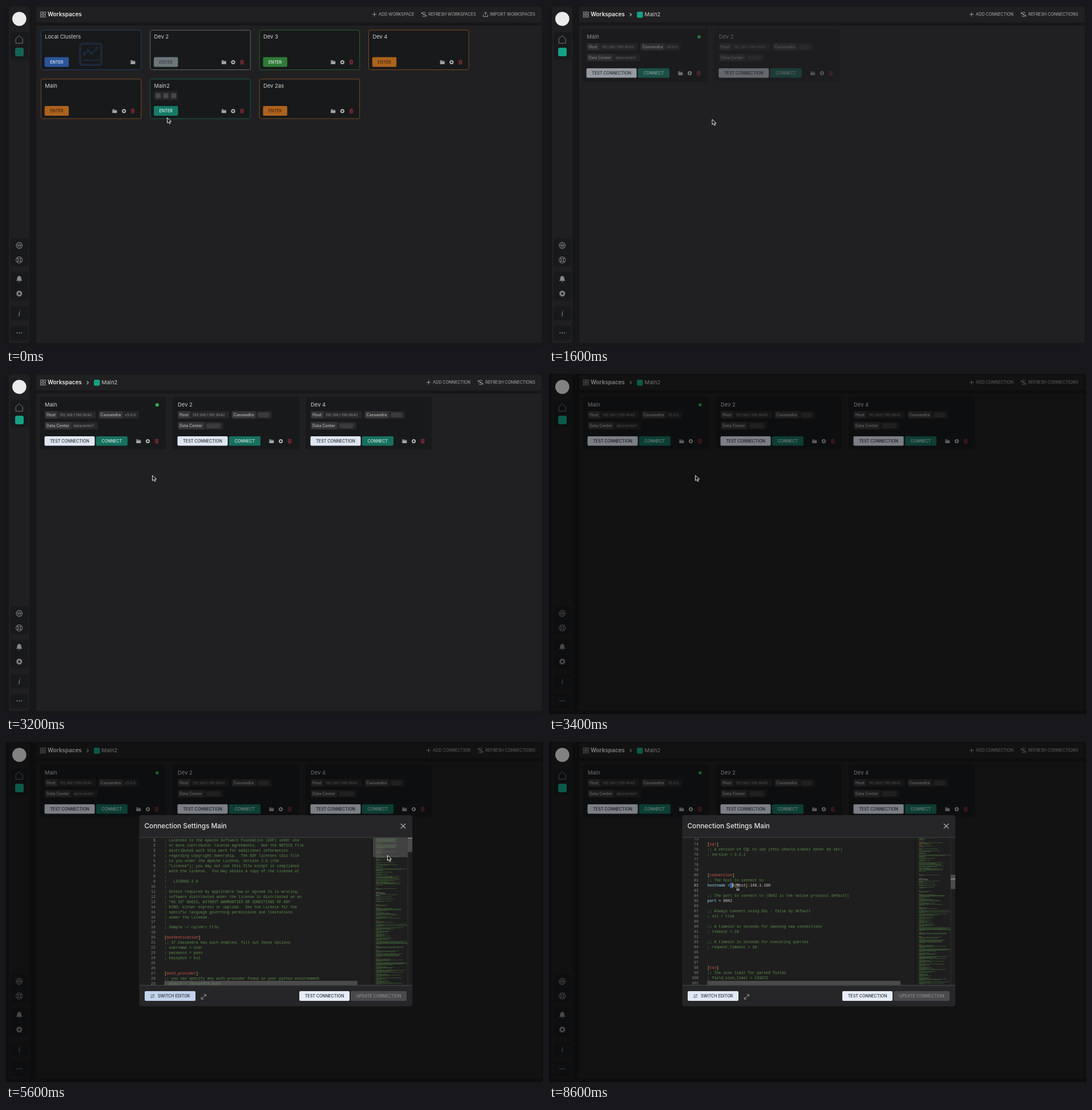
These frames come from a looping animation (941x595 px, 8.7 s). An HTML page:

```html
<!DOCTYPE html>
<html lang="en">
<head>
<meta charset="utf-8">
<title>Workspaces</title>
<style>
html, body { margin: 0; width: 100%; height: 100%; overflow: hidden; background: #171719; }
svg { display: block; width: 941px; height: 595px; font-family: Inter, sans-serif; }
text { white-space: pre; }
.code text { font: 6.57px "Liberation Mono", monospace; }
</style>
</head>
<body>
<svg id="stage" viewBox="0 0 941 595"></svg>
<script>
const LOOP = 8700;
const TEAL = '#16a085', PANEL = '#202022', DARK = '#18191b';
const LINE = 8.98, MINI = 1.2, CHAR = 3.942;

// Drawing helpers; text is placed by the middle of its capitals.
const rect = (x, y, w, h, fill, r = 0, more = '') =>
  `<rect x="${x}" y="${y}" width="${w}" height="${h}" rx="${r}" fill="${fill}" ${more}/>`;
const text = (x, y, s, size, fill, more = '') =>
  `<text x="${x}" y="${y + size * .36}" font-size="${size}" fill="${fill}" ${more}>${s}</text>`;
const stroke = (d, color, w = 1, more = '') =>
  `<path d="${d}" fill="none" stroke="${color}" stroke-width="${w}" ${more}/>`;
const ring = (x, y, r, color, w = 1) =>
  `<circle cx="${x}" cy="${y}" r="${r}" fill="none" stroke="${color}" stroke-width="${w}"/>`;
const disc = (x, y, r, fill, more = '') => `<circle cx="${x}" cy="${y}" r="${r}" fill="${fill}" ${more}/>`;
const at = (x, y, s) => `<g transform="translate(${x} ${y})">${s}</g>`;
const group = (id, s) => `<g id="${id}">${s}</g>`;
const button = (x, y, w, h, fill, label, color) =>
  rect(x, y, w, h, fill, 2) +
  text(x + w / 2, y + h / 2, label, 7.15, color, 'text-anchor="middle" font-weight="500"');

const folder = (x, y) => at(x, y, '<path d="M-4-3.2h3l1 1h4v5.6h-8z" fill="#a9a9a9"/>' + stroke('M-4-1.3h8', DARK, .5));
const cog = (x, y) => at(x, y, ring(0, 0, 2.6, '#b4b4b4', 2.1));
const trash = (x, y) => at(x, y, stroke('M-3.3-2.6h6.6M-1.2-3.6h2.4M-2.4-2.4l.3 5.8h4.2l.3-5.8M-.8-1v3M.8-1v3', '#b03346', .9));
const tools = (x, y) => folder(x, y) + cog(x + 16.2, y) + trash(x + 31.8, y);
const plus = x => stroke(`M${x - 3.7} 14.7h7.4M${x} 11v7.4`, '#aaa', .9);
const refresh = x => at(x, 14.7,
  stroke('M-3.6-1.5A3.9 3.9 0 0 1 3.4-2M3.6 1.5A3.9 3.9 0 0 1-3.4 2M-4-4v2.7h2.7M4 4v-2.7h-2.7', '#aaa', .9) + disc(0, 0, 1.3, '#aaa'));
const action = (x, s) => text(x, 14.7, s, 7.2, '#b0b0b0');

function sidebar() {
  const grey = '#858585';
  const blocks = [[46, 48], [406, 50], [465, 51], [525, 25], [559, 26]];
  return rect(5, 1, 36, 589, '#1f1f21', 4) +
    blocks.map(([y, h]) => rect(8, y, 30.5, h, DARK, 4)).join('') +
    disc(23.3, 22.5, 12.3, '#ececec') +
    stroke('M17.2 57.2 23.2 52l6 5.2v8h-12z', grey, .9) +
    group('badge', rect(16, 73, 15, 15, TEAL, 3)) +
    ring(23.2, 419, 5.4, grey) + stroke('M23.2 413.6v10.8M17.8 419h10.8M20 415q3 4 0 8M26.4 415q-3 4 0 8', grey, .8) +
    ring(23.2, 444.3, 5.6, grey) + ring(23.2, 444.3, 2.6, grey) +
    stroke('M19.3 440.4l2 2M27.1 440.4l-2 2M19.3 448.2l2-2M27.1 448.2l-2-2', grey, 1.4) +
    `<path d="M18 481q1.6-1.6 1.6-5 .4-3 3.6-3.8 3.200.8 3.600 3.800 0 3.400 1.600 5zM21.800 482h2.800q-1.400 2.800-2.800 0" fill="${grey}"/>` +
    ring(23.2, 503.3, 3.3, grey, 2.4) +
    `<g stroke-dasharray="2 1.77">${ring(23.2, 503.3, 4.8, grey, 1.2)}</g>` +
    text(23.2, 537.6, 'i', 14, grey, 'text-anchor="middle" font-style="italic" font-family="Liberation Serif, serif"') +
    [19.4, 23.2, 27].map(x => disc(x, 572, 1.1, grey)).join('');
}

function header() {
  const tile = (x, y) => rect(x, y, 3.6, 3.6, 'none', 0, 'stroke="#a0a0a0" stroke-width=".9"');
  return rect(53, 1, 886, 27.5, PANEL, 3) +
    tile(60.3, 10.4) + tile(65.7, 10.4) + tile(60.3, 15.8) + tile(65.7, 15.8) +
    text(73, 14.7, 'Workspaces', 9.9, '#ededed', 'font-weight="600"') +
    group('crumb', stroke('M141.700 12.400l2.800 2.700-2.800 2.700', '#c8c8c8', 1.1) +
      rect(154, 10, 10.5, 10.5, TEAL, 2) + text(167.5, 15, 'Main2', 9.6, '#cfcfcf')) +
    group('homeActions', plus(645.5) + action(653, 'ADD WORKSPACE') + refresh(732.5) +
      action(740, 'REFRESH WORKSPACES') +
      stroke('M836.500 15v3.600h7.600V15M840.300 16.300v-5.500M837.900 13l2.400-2.400 2.400 2.400', '#aaa', .9) +
      action(848, 'IMPORT WORKSPACES')) +
    group('linkActions', plus(740.5) + action(748, 'ADD CONNECTION') + refresh(831.5) +
      action(840, 'REFRESH CONNECTIONS'));
}

function workspaces() {
  const themes = {
    blue: ['#26486f', '#2b5499', '#e4e9f2'], grey: ['#687174', '#6c777a', '#33393b'],
    green: ['#27692f', '#2f7b37', '#e4efe4'], orange: ['#87501f', '#ad621d', '#43260c'],
    teal: ['#1a6353', '#167a66', '#e4f2ee']
  };
  const cards = [['Local Clusters', 'blue', 0, 0], ['Dev 2', 'grey', 1, 0], ['Dev 3', 'green', 2, 0],
    ['Dev 4', 'orange', 3, 0], ['Main', 'orange', 0, 1], ['Main2', 'teal', 1, 1], ['Dev 2as', 'orange', 2, 1]];
  const emblem = rect(130, 66, 37, 37, 'none', 4, 'stroke="#1d2738" stroke-width="4"') +
    stroke('M137 84l7-6 6 5 9-9M134 95h30', '#1d2738', 3) +
    [[137, 84], [144, 78], [150, 83], [159, 74]].map(([x, y]) => disc(x, y, 3, '#1d2738')).join('');
  return cards.map(([name, theme, col, row]) => {
    const x = 61.4 + col * 191.4, y = 42.3 + row * 85.6, [edge, fill, ink] = themes[theme];
    const local = name === 'Local Clusters';
    const chips = name === 'Main2' ? rect(259.5, 149.3, 41, 15.500, '#262628', 2) +
      [262, 275.7, 289.400].map(cx => rect(cx, 152.5, 9, 9, '#464648', 2)).join('') : '';
    return rect(x, y, 175.4, 69.2, '#17191a', 3, `stroke="${edge}" stroke-width=".9"`) +
      (local ? emblem : '') + text(x + 6.8, y + 11.4, name, 9.4, '#d4d4d4') + chips +
      button(x + 6.2, y + 47.2, 42.4, 17, fill, 'ENTER', ink) +
      (local ? folder(x + 161, y + 56) : tools(x + 129, y + 56));
  }).join('');
}

function connections() {
  const chip = (x, y, label, split, width, value) =>
    rect(x, y, width, 13, '#262628', 2) + rect(x, y, split, 13, '#343436', 2) +
    text(x + 3, y + 6.5, label, 6.9, '#adadad', 'font-weight="600"') +
    (value ? text(x + split + 4, y + 6.5, value, 6.5, '#8f8f8f')
           : rect(x + split + 4, y + 2.3, width - split - 9, 8.6, '#3a3a3c', 3));
  return ['Main', 'Dev 2', 'Dev 4'].map((name, i) => {
    const x = 59.3 + i * 233, first = !i;
    return group('link' + i, rect(x, 40, 221, 92.3, DARK, 4) +
      text(x + 8.8, 53.7, name, 9.4, '#d2d2d2') +
      (first ? disc(x + 205.5, 54, 2.8, '#2bb24c', 'id="pulse"') : '') +
      chip(x + 8.8, 65, 'Host', 22, 90, '192.168.1.190:9042') +
      chip(x + 103.3, 65, 'Cassandra', 42, 70.5, first && 'v5.0.0') +
      chip(x + 8.8, 84, 'Data Center', 46, first ? 93 : 80, first && 'datacenter1') +
      button(x + 8.2, 109, 88, 16.6, '#dfe6f2', 'TEST CONNECTION', '#2b2e33') +
      button(x + 98.5, 109, 55.2, 16.6, '#17705f', 'CONNECT', '#d8ebe6') +
      tools(x + 173, 117.6));
  }).join('');
}

function form() {
  const field = (y, label, value, hint, must) =>
    rect(374.500, y, 316.500, 26.4, 'none', 2, 'stroke="#727274" stroke-width=".9"') +
    (label ? rect(378.5, y - 2, label.length * 4.3, 4, '#262628') + text(381.5, y + .6, label, 7.1, '#c9c9c9') : '') +
    text(381.300, y + 13.6, value, 9.1, '#dedede') + text(374.5, y + 33, hint, 6.6, '#7d7d7f') +
    (must ? rect(645.500, y + 29.800, 46, 9, '#bdbdbf', 2) +
      text(668.5, y + 34.3, 'Mandatory field', 5, '#2b2b2b', 'text-anchor="middle" font-weight="700"') : '');
  const tab = (y, s, color) => text(251.5, y, s, 8.3, color, 'font-weight="500"');
  return rect(242.5, 177.5, 120.5, 136, '#1c1c1f', 4) +
    tab(197, 'Basic', '#e8e8e8') + stroke('M249 217.600h107', '#c8d2e6', 1.3) +
    rect(251.3, 213, 31.4, 9.5, '#c3cfe6', 2) +
    text(267, 217.800, 'Optional', 5.8, '#2f3b55', 'text-anchor="middle" font-weight="500"') +
    tab(239.600, 'Authentication', '#858587') + tab(267.2, 'SSH Tunnel', '#858587') +
    tab(294.2, 'SSL Configuration', '#858587') +
    field(180.4, 'Connection Name', 'Main', 'Example: Main Cluster') +
    field(234, '', 'Cassandra Data Center', 'Example: datacenter1') +
    field(287.6, 'Cassandra Host Name', '192.168.1.190', 'Example: 192.168.0.10', true) +
    field(340.8, 'Port', '9042', 'Default: 9042', true);
}

function configLines() {
  const lines = `; Licensed to the Apache Software Foundation (ASF) under one
; or more contributor license agreements.  See the NOTICE file
; distributed with this work for additional information
; regarding copyright ownership.  The ASF licenses this file
; to you under the Apache License, Version 2.0 (the
; "License"); you may not use this file except in compliance
; with the License.  You may obtain a copy of the License at
;
;   LICENSE-2.0
;
; Unless required by applicable law or agreed to in writing,
; software distributed under the License is distributed on an
; "AS IS" BASIS, WITHOUT WARRANTIES OR CONDITIONS OF ANY
; KIND, either express or implied.  See the License for the
; specific language governing permissions and limitations
; under the License.
;
; Sample ~/.cqlshrc file.

[authentication]
;; If Cassandra has auth enabled, fill out these options
; username = user
; password = pass
; keyspace = ks1


[auth_provider]
;; you can specify any auth provider found in your python environment
; module = cassandra.auth
; classname = PlainTextAuthProvider

[protocol]
;; Specify a specific protocol version
; version = None

[ui]
;; Whether or not to display query results with colors
; color = on

;; Used for displaying timestamps (and reading them with COPY)
; time_format = %Y-%m-%d %H:%M:%S%z

;; Display timezone
;timezone = Etc/UTC

;; The number of digits displayed after the decimal point for single and double precision numbers
;; (note that increasing this to large numbers can result in unusual values)
;float_precision = 5
;double_precision = 12

;; Used for automatic completion and suggestions
; completekey = tab

;; The encoding used for characters
; encoding = utf8

; To use another than the system default browser for cqlsh HELP to open
; the CQL doc HTML, use the 'browser' preference.
; If the field value is empty or not specified, cqlsh will use the
; default browser (specifying 'browser = default' does not work).
;
; Supported browsers are those supported by the Python webbrowser module.
; (https:\/\/docs.python.org/3/library/webbrowser.html).
;
; Hint: to use Google Chome, use
; 'browser = open -a /Applications/Google Chrome.app %s' on Mac OS X and
; 'browser = /usr/bin/google-chrome-stable %s' on Linux and
; 'browser = C:/Program Files/Google/Chrome/chrome.exe %s' on Windows.
;
; browser = default



[cql]
;; A version of CQL to use (this should almost never be set)
; version = 3.2.1



[connection]
;; The host to connect to
hostname = $\{host}.168.1.190

;; The port to connect to (9042 is the native protocol default)
port = 9042

;; Always connect using SSL - false by default
; ssl = true

;; A timeout in seconds for opening new connections
; timeout = 10

;; A timeout in seconds for executing queries
; request_timeout = 10



[csv]
;; The size limit for parsed fields
; field_size_limit = 131072
`.split('\n');
  // Filler below the readable part, seen only in the overview strip.
  let seed = 7;
  const random = () => (seed = seed * 16807 % 2147483647) / 2147483647;
  while (lines.length < 265) {
    if (random() < .16) lines.push('', '[section]');
    for (let n = 1 + random() * 3; n > 0; n--) {
      let s = ';;';
      for (let w = 3 + random() * 12; w > 0; w--) s += ' ' + 'x'.repeat(2 + random() * 7);
      lines.push(s);
    }
    lines.push('; option = value', '');
  }
  return lines;
}

function editor() {
  const lines = configLines();
  const span = (s, color, more = '') => `<tspan fill="${color}" ${more}>${s}</tspan>`;
  const tint = s => s[0] === ';' ? '#5a9148' : s[0] === '[' ? '#d9534f' : '#c4d6e0';
  const paint = s => {
    if (s[0] === ';') return span(s.replace(/https:[^)]+/, '<tspan text-decoration="underline">$&</tspan>'), tint(s));
    if (s[0] === '[') return span('[', '#e2c04a') + span(s.slice(1, -1), tint(s)) + span(']', '#e2c04a');
    const [key, value] = s.split(' = ');
    return span(key, '#9cdcfe') + span(' = ', '#d4d4d4') +
      span(value.replace(/[{}]/g, b => span(b, '#e2c04a')), '#d4d4d4');
  };
  let rows = '', mini = '';
  lines.forEach((s, i) => {
    const y = 173.8 + i * LINE, n = i + 1;
    if (n < 104) {
      rows += `<text x="262" y="${y}" text-anchor="end" fill="${n === 1 || n === 82 ? '#c6c6c6' : '#858585'}">${n}</text>`;
      if (s) rows += `<text x="277.6" y="${y}">${paint(s)}</text>`;
    }
    let d = '';
    for (const word of s.matchAll(/\S+/g))
      d += `M${(648 + word.index * .6).toFixed(1)} ${(167.8 + i * MINI).toFixed(1)}h${(word[0].length * .6).toFixed(1)}`;
    if (d) mini += stroke(d, tint(s), .8, 'opacity=".6"');
  });
  const y82 = 167 + 81 * LINE;
  const chosen = rect(277.6 + 10 * CHAR, y82, CHAR, LINE, '#2c5f9e') + rect(277.6 + 11 * CHAR, y82, .8, LINE, '#ddd');
  return rect(233.500, 167.500, 478.500, 258, '#1e1e1e') +
    `<g class="code" clip-path="url(#textArea)">${group('rows', chosen + rows)}</g>` +
    rect(277.5, 418, 338.500, 7.5, '#797979', 0, 'opacity=".5"') +
    rect(641, 168, 2, 257.500, '#151515', 0, 'opacity=".7"') +
    `<g clip-path="url(#miniArea)">${group('mini', mini)}</g>` +
    rect(643, 167.500, 61, 34, '#797979', 0, 'id="slider" opacity=".4"') +
    stroke('M704 168v257.500', '#3a3a3a', .7) +
    rect(704, 167.5, 8, 25, '#5a5a5a', 0, 'id="thumb" opacity=".75"') +
    rect(704, 167.5, 8, 1.4, '#a0a0a0', 0, 'id="mark"') +
    stroke('M342.500 449.700l7.500-7.500M346.800 442h3.500v3.500M342.200 446.500v3.500h3.500', '#b5b5b5', .9);
}

function modal() {
  const rule = y => stroke(`M233.500 ${y}h478.500`, '#434346', 1.2);
  return rect(233.5, 128, 478.500, 334.500, '#262628', 4) +
    text(242.5, 147.2, 'Connection Settings Main', 11.75, '#e6e6e6', 'font-weight="500"') +
    stroke('M691.700 142.800l8.600 8.600M700.300 142.800l-8.600 8.600', '#c8c8c8', 1.1) +
    group('form', form()) + group('editor', editor()) + rule(167) + rule(425.8) +
    rect(243, 436, 89, 17, '#dfe7f6', 2, 'id="switch"') +
    stroke('M253.500 443h6.500l-1.800-1.700M260 446.300h-6.500l1.800 1.700', '#2a2d33', .8) +
    text(266, 444.5, 'SWITCH EDITOR', 7.1, '#2a2d33', 'font-weight="500"') +
    button(514, 436, 88, 17, '#e6edf9', 'TEST CONNECTION', '#25282d') +
    button(604, 436, 98, 17, '#4a4a4c', 'UPDATE CONNECTION', '#8e8e90');
}

const outlined = 'fill="#111" stroke="#fff" stroke-width=".9" stroke-linejoin="round"';
const pointers =
  `<path id="arrow" d="M.5.5v9.200l2.300-2 1.500 3.400 1.800-.8-1.500-3.300h3z" ${outlined}/>` +
  `<path id="hand" d="M2.500.8q1.200-.6 1.600.8l.6 2.800 4.200 1q1.200.4 1 2l-.8 4h-4.600l-3.600-4.200q.200-1.400 1.800-.4l.400.300-1.200-4.800q-.200-1.200.600-1.500z" ${outlined}/>` +
  group('beam', stroke('M-2.500-4.500q2.500 0 2.500 2v5q0 2-2.500 2M2.500-4.500q-2.500 0-2.500 2v5q0 2 2.500 2', '#fff', 2.6) +
    stroke('M-2.500-4.500q2.500 0 2.500 2v5q0 2-2.500 2M2.500-4.500q-2.500 0-2.500 2v5q0 2 2.500 2M-1.200 1h2.400', '#111', 1));

const stage = document.getElementById('stage');
stage.innerHTML =
  `<clipPath id="textArea">${rect(233.5, 168, 409.500, 257.500, '#000')}</clipPath>` +
  `<clipPath id="miniArea">${rect(643, 168, 61, 257.500, '#000')}</clipPath>` +
  rect(0, 0, 941, 595, '#171719') + sidebar() + header() + rect(53, 34, 886, 555.5, PANEL, 3) +
  group('home', workspaces()) + group('links', connections()) +
  rect(0, 0, 941, 595, '#000', 0, 'id="shade" opacity=".45"') +
  group('modal', modal()) + group('cursor', pointers);

// Moments at which the picture changes.
const ticks = [0, 100, 200];
for (let t = 400; t <= 2900; t += 100) ticks.push(t);
ticks.push(3100, 3200, 3400, 3600, 3700, 4100, 4300, 4500, 5300, 5600, 6600, 8600);

// time, x, y
const path = [[0, 282, 195], [100, 284, 192], [200, 285, 188], [400, 286, 190], [1000, 304, 240], [1200, 304, 240],
  [2000, 267, 156], [2100, 262, 144], [2500, 246, 115], [2900, 246, 115], [3100, 250, 132], [3200, 256, 177],
  [3700, 256, 177], [4100, 285, 330], [4300, 309, 425], [4500, 302, 441], [5300, 655, 190], [5600, 668, 198],
  [6600, 668, 222], [8600, 331, 254]];

const clamp = v => Math.max(0, Math.min(1, v));
const ramp = (t, from, to) => clamp((t - from) / (to - from));
const el = id => document.getElementById(id);
const fade = (id, v) => {
  el(id).setAttribute('opacity', v);
  el(id).style.display = v ? '' : 'none';
};
const move = (id, x, y) => el(id).setAttribute('transform', `translate(${x} ${y})`);

function pointAt(t) {
  const i = path.findIndex(p => p[0] >= t), b = path[i], a = path[Math.max(0, i - 1)];
  const k = ramp(t, a[0], b[0] || 1);
  return [a[1] + (b[1] - a[1]) * k, a[2] + (b[2] - a[2]) * k];
}

function render(t) {
  const leave = ramp(t, 300, 900);
  fade('home', 1 - leave);
  fade('homeActions', 1 - leave);
  fade('linkActions', leave);
  fade('badge', .55 + .45 * leave);
  fade('crumb', ramp(t, 950, 1550));
  for (let i = 0; i < 3; i++) {
    const shown = 1 - (1 - ramp(t, 1300 + i * 150, 2400 + i * 150)) ** 3;
    fade('link' + i, shown);
    move('link' + i, -5 * (1 - shown), 0);
  }
  el('pulse').setAttribute('r', 2.6 + .6 * Math.abs(Math.cos(t / 1000 * Math.PI)));

  fade('shade', t >= 3400 ? .45 : 0);
  fade('modal', t < 3600 ? 0 : t < 3700 ? .2 : t < 4100 ? .6 : 1);
  move('modal', 0, t < 3700 ? -42 : t < 4100 ? -25 : 0);
  const coding = t >= 5300;
  fade('form', coding ? 0 : 1);
  fade('editor', coding ? 1 : 0);
  el('switch').setAttribute('fill', coding && t < 8600 ? '#c3d3ec' : '#e1e9f7');

  const scroll = t >= 8600 ? 648 : t >= 6600 ? 336.7 : 0;
  const slide = scroll * .0965;
  move('rows', 0, -scroll);
  move('mini', 0, slide - scroll * MINI / LINE);
  move('slider', 0, slide);
  move('thumb', 0, scroll * .1);
  move('mark', 0, t >= 8600 ? 71.5 : 0);
  fade('slider', t >= 5600 && t < 8600 ? .4 : 0);

  const hand = t >= 200 && t < 500 || t >= 2500 && t < 3100 || t >= 4500 && t < 5300;
  const shape = t >= 8600 ? 'beam' : hand ? 'hand' : 'arrow';
  for (const id of ['arrow', 'hand', 'beam']) fade(id, id === shape ? 1 : 0);
  move('cursor', ...pointAt(t));
}

const start = performance.now();
let last = -1;
function frame() {
  const now = (performance.now() - start) % LOOP;
  const tick = ticks.findLast(t => t <= now);
  if (tick !== last) render(last = tick);
  requestAnimationFrame(frame);
}
frame();
</script>
</body>
</html>
```
